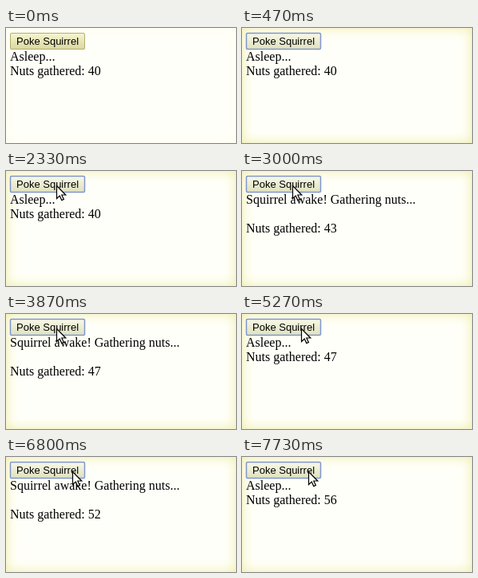
Animation, 288 px wide and 144 px high, one loop 8 s. Source, as an HTML page:

```html
<!DOCTYPE html>
<html lang="en">
<head>
<meta charset="utf-8">
<title>Poke Squirrel</title>
<style>
html, body { margin: 0; width: 100%; height: 100%; overflow: hidden; background: #fffff9; }
svg { position: absolute; left: 0; top: 0; display: block; }
#glow { position: absolute; left: 0; top: 0; width: 288px; height: 144px; box-shadow: inset 0 0 15px #eeeca6; }
.body { font: 16px "Liberation Serif", "Times New Roman", serif; }
.label { font: 13px "Liberation Sans", Arial, sans-serif; }
</style>
</head>
<body>
<div id="glow"></div>
<svg width="288" height="144" viewBox="0 0 288 144">
  <defs>
    <linearGradient id="face" x1="0" y1="0" x2="0" y2="1">
      <stop id="faceTop" offset="0"/>
      <stop id="faceBottom" offset="1"/>
    </linearGradient>
  </defs>
  <rect id="button" x="5.5" y="6.5" width="93" height="20" rx="1.5" fill="url(#face)"/>
  <text class="label" x="13" y="21">Poke Squirrel</text>
  <text id="status" class="body" x="5" y="41"></text>
  <text id="nuts" class="body" x="5"></text>
  <path id="cursor" d="M.5 .5V16.5L4.2 13L6.8 18.6L9.4 17.4L6.8 12H11.8Z" fill="#fffff8" stroke="#000" stroke-width="1.2"/>
</svg>
<script>
const LOOP = 8000, FRAME = 200 / 3;
const $ = id => document.getElementById(id);
const clamp = v => Math.max(0, Math.min(1, v));
const mix = (a, b, u) => `rgb(${a.map((v, i) => Math.round(v + (b[i] - v) * u))})`;

// Each run: press, release, wake and sleep times, then the moments a nut is found.
const runs = [
  { down: 2200, up: 2330, wake: 2470, sleep: 3930, finds: [2600, 2800, 3000, 3200, 3400, 3600, 3800] },
  { down: 5600, up: 5730, wake: 5870, sleep: 7730, finds: [6000, 6200, 6400, 6600, 6800, 7070, 7270, 7470, 7670] }
];
const finds = runs.flatMap(run => run.finds);
const during = (t, from, to) => runs.some(run => t >= run[from] && t < run[to]);

const framesSince = (t, start) => Math.floor((t - start) / FRAME + 0.15);

function cursorAt(t) {
  if (t >= 5270) return [74 + 4.5 * Math.min(2, framesSince(t, 5270)), 18];
  const left = (1 - clamp(framesSince(t, 1270) / 12)) ** 3;
  return [63 + 181 * left, 18 + 60 * left];
}

function draw(t) {
  const focus = t < 70 ? 0 : clamp((Math.floor((t - 70) / 80) + 1) / 6);
  const pressed = during(t, "down", "up");
  const awake = during(t, "wake", "sleep");

  $("glow").style.opacity = 0.12 + 0.88 * focus;
  $("button").setAttribute("stroke", mix([178, 174, 112], [128, 150, 204], focus));
  $("button").setAttribute("stroke-width", 1 + 0.5 * focus);
  const light = mix([246, 245, 208], [248, 249, 232], focus);
  const dark = mix([218, 216, 160], [223, 225, 190], focus);
  $("faceTop").setAttribute("stop-color", pressed ? dark : light);
  $("faceBottom").setAttribute("stop-color", pressed ? light : dark);

  $("status").textContent = awake ? "Squirrel awake! Gathering nuts..." : "Asleep...";
  $("nuts").textContent = "Nuts gathered: " + (40 + finds.filter(at => t >= at).length);
  $("nuts").setAttribute("y", awake ? 77 : 59);

  const [x, y] = cursorAt(t).map(Math.round);
  $("cursor").setAttribute("transform", `translate(${x} ${y})`);
  $("cursor").setAttribute("visibility", t < 1270 ? "hidden" : "visible");
}

const start = performance.now();
function tick() {
  draw((performance.now() - start) % LOOP);
  requestAnimationFrame(tick);
}
tick();
</script>
</body>
</html>
```
